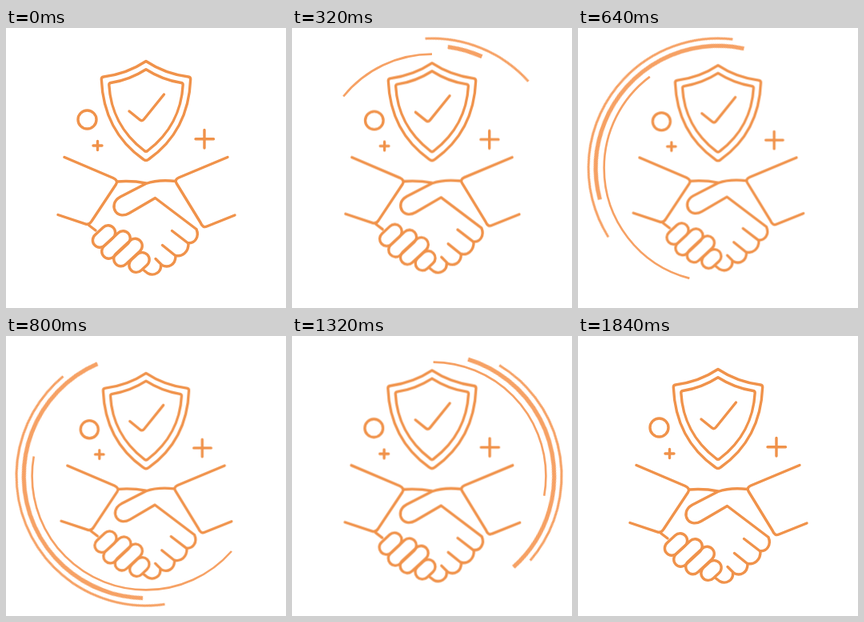
An HTML page that plays this animation: 350 by 350 pixels, repeating every 2.32 s.

```html
<!DOCTYPE html>
<html lang="en">
<head>
<meta charset="utf-8">
<title>Trusted handshake</title>
<style>
  @property --head { syntax: "<length>"; inherits: false; initial-value: 0px; }
  @property --tail { syntax: "<length>"; inherits: false; initial-value: 0px; }

  html, body { margin: 0; width: 100%; height: 100%; overflow: hidden; background: #fff; }
  svg {
    display: block; width: 100vw; height: 100vh;
    fill: none; stroke: #f0924a; stroke-width: 3.4;
    stroke-linecap: round; stroke-linejoin: round;
  }

  .art, .arc {
    transform-origin: 175px 175px;
    animation: 2320ms cubic-bezier(.3333, 0, .6667, 1) infinite;
  }
  .art { animation-name: breathe; }

  /* Each ring is 360 units long, so head and tail read as degrees. */
  .arc {
    stroke: #f6a164; stroke-linecap: butt;
    stroke-dasharray: calc(var(--head) - var(--tail)) 720px;
    stroke-dashoffset: calc(0px - var(--tail));
  }
  .inner { stroke-width: 2.6; animation-name: head, tail; }
  .outer { stroke-width: 3; animation-name: head, tail, turn-outer; }
  .middle { stroke-width: 5.2; animation-name: head-late, tail-late, turn-middle; }

  @keyframes breathe {
    0% { transform: scale(1); }
    29.31% { transform: scale(.961); }
    72.41%, 100% { transform: scale(1); }
  }
  @keyframes head {
    0% { --head: 0px; }
    58.4%, 100% { --head: 360px; }
  }
  @keyframes tail {
    0%, 14.87% { --tail: 0px; }
    79.31%, 100% { --tail: 360px; }
  }
  @keyframes head-late {
    0%, 7.2% { --head: 0px; }
    58.2%, 100% { --head: 360px; }
  }
  @keyframes tail-late {
    0%, 21.98% { --tail: 0px; }
    79.31%, 100% { --tail: 360px; }
  }
  @keyframes turn-outer {
    0% { transform: rotate(50deg); }
    79.31%, 100% { transform: rotate(26deg); }
  }
  @keyframes turn-middle {
    0% { transform: rotate(25deg); }
    79.31%, 100% { transform: rotate(14.5deg); }
  }
</style>
</head>
<body>
<svg viewBox="0 0 350 350">
  <path class="arc outer" pathLength="360" d="M175 13a162 162 0 1 0 0 324a162 162 0 1 0 0-324"/>
  <path class="arc middle" pathLength="360" d="M175 22.3a152.7 152.7 0 1 0 0 305.4a152.7 152.7 0 1 0 0-305.4"/>
  <path class="arc inner" pathLength="360" d="M175 32.6a142.4 142.4 0 1 0 0 284.8a142.4 142.4 0 1 0 0-284.8"/>

  <g class="art">
    <!-- shield -->
    <path d="M175 41.5C190 51.5 209 58.5 228 61Q230.800 61.500 230.700 64C229 107 211 141 178.500 164Q175 167 171.500 164C139 141 121 107 119.300 64Q119.200 61.500 122 61C141 58.500 160 51.500 175 41.500Z"/>
    <path d="M175 51.700C188 60 203 66 219 68.500Q221.300 69 221.200 71C219.500 103 205 132 177.500 153Q175 155.500 172.500 153C145 132 130.500 103 128.800 71Q128.700 69 131 68.500C147 66 162 60 175 51.700Z"/>
    <path d="M154 104L167 114.500Q170 117 172.500 114L197.500 83"/>

    <!-- ornaments -->
    <circle cx="101.500" cy="114.500" r="11.500"/>
    <path d="M114.500 141.500v11M109 147h11M248 127.500v22.500M237 138.700h22.500"/>

    <!-- sleeves -->
    <path d="M73 161.500L134 187.500Q140.500 190.500 137.500 195.500L107 241.500Q104 246.500 99 244.800L65 233.500"/>
    <path d="M277 161.500L216 187Q210.500 189.500 213 194L243 243Q246 250.500 251 248L286 234"/>

    <!-- hands -->
    <path d="M139 192C152 191 165 192 175 194M103.500 246.500L112 253"/>
    <path d="M212 191.500C198 190 186 190.500 175 194.500L143 211C134 216 133.500 224 137 229.500C141 235 148 235 154 231.500L186.500 212.500L238 251.500C242 261 236 270 227 268.500L207.500 253.500"/>
    <path d="M228 269C228.500 280 220 287 211 284L195.500 271.500M212 285C212 296 203 300.500 195 296.500L187 288.500M193.500 296.500C194.500 305 185 311 177 306.500L172.500 303"/>
    <rect x="-16" y="-9" width="32" height="18" rx="9" transform="translate(122.500 260.500) rotate(-43)"/>
    <rect x="-21" y="-9" width="42" height="18" rx="9" transform="translate(137.500 271) rotate(-43)"/>
    <rect x="-21" y="-9" width="42" height="18" rx="9" transform="translate(152.500 280.500) rotate(-43)"/>
    <rect x="-14" y="-9" width="28" height="18" rx="9" transform="translate(166.500 293) rotate(-43)"/>
  </g>
</svg>
</body>
</html>
```
